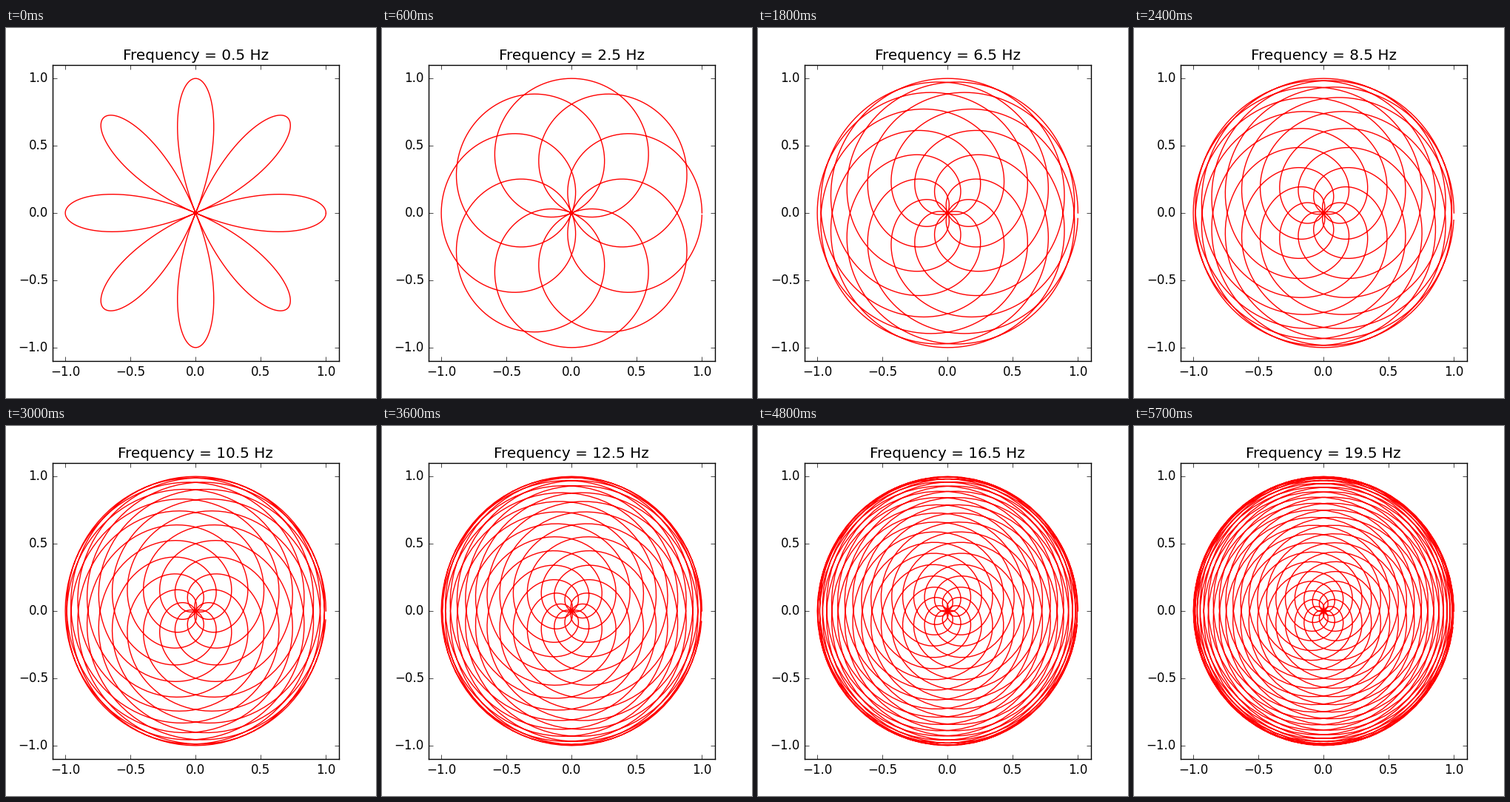
These frames come from a looping animation (500 px wide and 500 px high, 6 s). A matplotlib script:

```python
import numpy as np
import matplotlib.pyplot as plt
from matplotlib.animation import FuncAnimation

plt.style.use("classic")
plt.rcParams["font.family"] = "DejaVu Sans"

FRAMES = 20
INTERVAL = 300

# Half-open time range: the wound curve stops one sample short of closing.
t = np.arange(0, 2, 0.001)
signal = np.cos(2 * np.pi * 2 * t)

fig = plt.figure(figsize=(5, 5), dpi=100, facecolor="white")
ax = fig.add_axes([0.125, 0.1, 0.775, 0.8])
ax.set_xlim(-1.1, 1.1)
ax.set_ylim(-1.1, 1.1)
ticks = np.arange(-1, 1.1, 0.5)
ax.set_xticks(ticks)
ax.set_yticks(ticks)

curve, = ax.plot([], [], color="red", linewidth=1)
title = ax.set_title("")


def draw(i):
    freq = i + 0.5
    angle = 2 * np.pi * freq * t
    curve.set_data(signal * np.cos(angle), signal * np.sin(angle))
    title.set_text(f"Frequency = {freq:.1f} Hz")
    return curve, title


anim = FuncAnimation(fig, draw, frames=FRAMES, init_func=lambda: draw(0),
                     interval=INTERVAL, repeat=True, blit=False)
plt.show()
```
